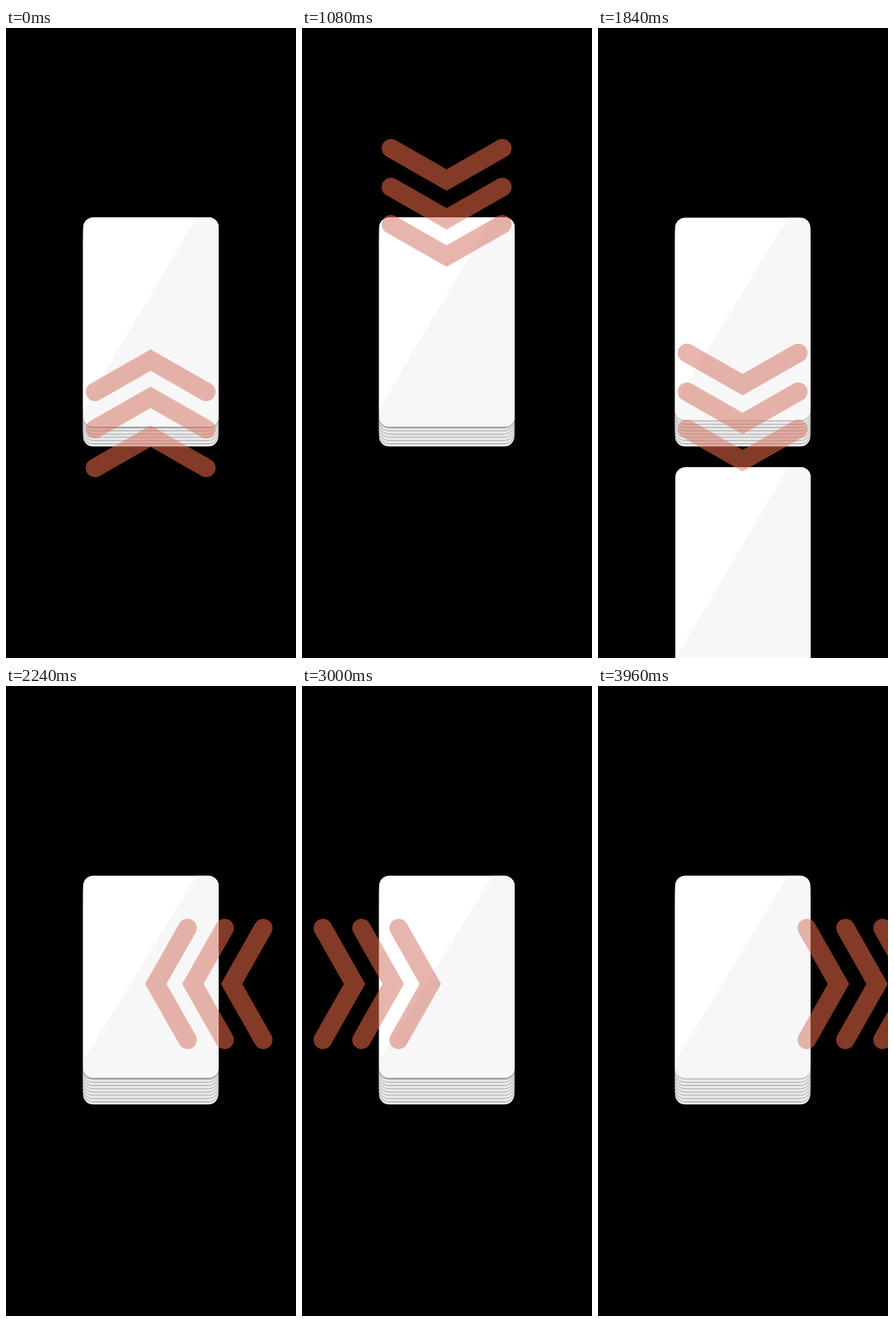
Recreate the animation shown at these times as an HTML page with a canvas. Size 375 px wide and 812 px high, loop 4000 ms.

```html
<!DOCTYPE html>
<html lang="en">
<head>
<meta charset="utf-8">
<title>Card swipes</title>
<style>
html, body { margin: 0; width: 100%; height: 100%; overflow: hidden; background: #000; }
canvas { display: block; width: 375px; height: 812px; }
</style>
</head>
<body>
<canvas id="stage"></canvas>
<script>
const W = 375, H = 812, STEP = 1000;
const canvas = document.getElementById('stage');
const ctx = canvas.getContext('2d');
const dpr = window.devicePixelRatio || 1;
canvas.width = W * dpr;
canvas.height = H * dpr;

// x, y: where the leading chevron starts; run: chevron travel; push: card travel
const SWIPES = [
  { dx: 0, dy: -1, turn: 0, x: 187, y: 469, run: 364, push: 322 },
  { dx: 0, dy: 1, turn: Math.PI, x: 187, y: 253, run: 264, push: 322 },
  { dx: -1, dy: 0, turn: -Math.PI / 2, x: 250, y: 384, run: 243, push: 158 },
  { dx: 1, dy: 0, turn: Math.PI / 2, x: 125, y: 384, run: 243, push: 158 }
];

// Ease-in-out, cubic-bezier(.42, 0, .58, 1)
function ease(u) {
  if (u <= 0) return 0;
  if (u >= 1) return 1;
  let lo = 0, hi = 1, p = 0.5;
  for (let i = 0; i < 24; i++) {
    p = (lo + hi) / 2;
    const q = 1 - p;
    const x = 1.26 * q * q * p + 1.74 * q * p * p + p * p * p;
    if (x < u) lo = p; else hi = p;
  }
  return 3 * (1 - p) * p * p + p * p * p;
}

const tween = (t, start, length) => ease((t - start) / length);

function roundBox(x, y, w, h, r) {
  ctx.beginPath();
  ctx.moveTo(x + r, y);
  ctx.arcTo(x + w, y, x + w, y + h, r);
  ctx.arcTo(x + w, y + h, x, y + h, r);
  ctx.arcTo(x, y + h, x, y, r);
  ctx.arcTo(x, y, x + w, y, r);
  ctx.closePath();
}

function drawCard(x, y, w, h, shade) {
  ctx.save();
  ctx.shadowColor = `rgba(0,0,0,${shade})`;
  ctx.shadowBlur = 3 * dpr;
  ctx.shadowOffsetY = dpr;
  roundBox(x, y, w, h, 13);
  ctx.fillStyle = '#fff';
  ctx.fill();
  ctx.restore();

  // Grey sheen below the diagonal
  ctx.save();
  ctx.clip();
  ctx.beginPath();
  ctx.moveTo(x + 146, y);
  ctx.lineTo(x + w, y);
  ctx.lineTo(x + w, y + h);
  ctx.lineTo(x, y + h);
  ctx.lineTo(x, y + h * 0.915);
  ctx.fillStyle = '#f7f7f7';
  ctx.fill();
  ctx.restore();
}

function drawDeck() {
  for (let i = 8; i >= 0; i--) drawCard(99.7, 244.4 + i * 4.2, 174.8, 261.2, 0.45);
}

function drawChevrons(swipe, shift) {
  ctx.save();
  ctx.translate(swipe.x + swipe.dx * shift, swipe.y + swipe.dy * shift);
  ctx.rotate(swipe.turn);
  ctx.lineWidth = 24;
  ctx.lineCap = 'round';
  ctx.lineJoin = 'miter';
  ctx.beginPath();
  for (const back of [0, 48, 98]) {
    ctx.moveTo(-72, back);
    ctx.lineTo(0, back - 41);
    ctx.lineTo(72, back);
  }
  // Dim what lies below, then add the red tint
  ctx.globalCompositeOperation = 'multiply';
  ctx.strokeStyle = 'rgb(100,123,134)';
  ctx.stroke();
  ctx.globalCompositeOperation = 'lighter';
  ctx.strokeStyle = 'rgb(131,58,39)';
  ctx.stroke();
  ctx.restore();
}

function draw(time) {
  const t = time % (STEP * SWIPES.length);
  const swipe = SWIPES[Math.floor(t / STEP)];
  const local = t % STEP;

  ctx.setTransform(dpr, 0, 0, dpr, 0, 0);
  ctx.fillStyle = '#000';
  ctx.fillRect(0, 0, W, H);
  drawDeck();

  if (local < 950) {
    if (swipe.dy) {
      const d = swipe.push * tween(local, 267, 545);
      drawCard(100, 244 + swipe.dy * d, 175, 270, 0.35);
    } else {
      const d = swipe.push * tween(local, 315, 225);
      drawCard(100 + swipe.dx * d, 245, 175, 260, d ? 0.3 : 0.45);
    }
  }
  drawChevrons(swipe, swipe.run * tween(local, 108, 748));
}

let begin = null;
function tick(now) {
  if (begin === null) begin = now;
  draw(now - begin);
  requestAnimationFrame(tick);
}
draw(0);
requestAnimationFrame(tick);
</script>
</body>
</html>
```
